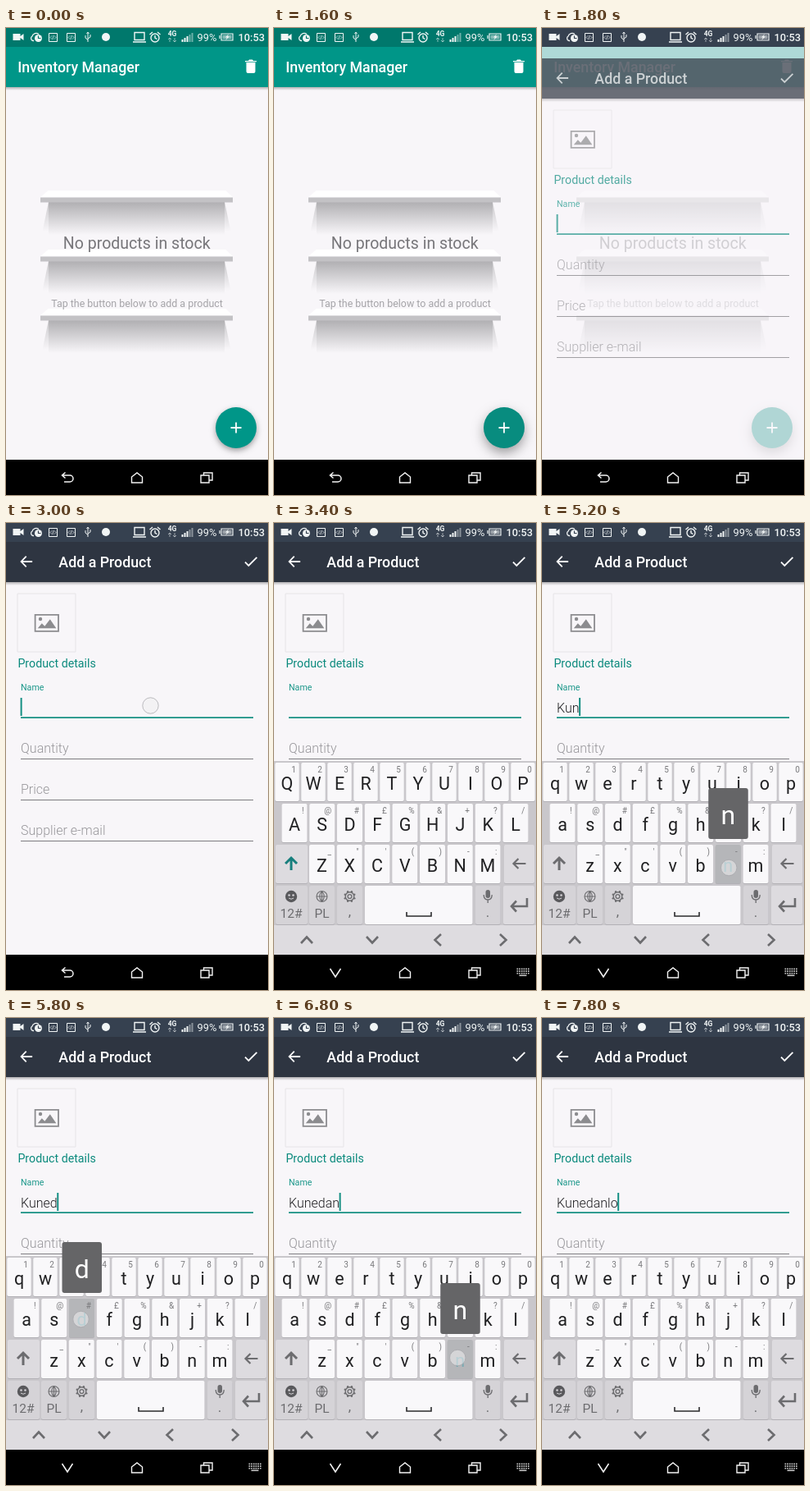
Write an HTML page with a canvas that moves like this. It is 320 by 569 pixels and loops after 8000 ms.

```html
<!DOCTYPE html>
<html lang="en">
<head>
<meta charset="utf-8">
<title>Inventory Manager</title>
<style>
html, body { margin: 0; width: 100%; height: 100%; overflow: hidden; background: #000; }
canvas { display: block; width: 320px; height: 569px; }
</style>
</head>
<body>
<canvas id="stage"></canvas>
<script>
const W = 320, H = 569, LOOP = 8000, STEP = 200;
const TEAL = '#009688', PAGE = '#f8f6f9';
const canvas = document.getElementById('stage');
const ctx = canvas.getContext('2d');
const ratio = window.devicePixelRatio || 1;
canvas.width = W * ratio;
canvas.height = H * ratio;

function rect(x, y, w, h, color, r = 0) {
  ctx.fillStyle = color;
  ctx.beginPath();
  ctx.roundRect(x, y, w, h, r);
  ctx.fill();
}

function disc(x, y, r, color) {
  ctx.fillStyle = color;
  ctx.beginPath();
  ctx.arc(x, y, r, 0, Math.PI * 2);
  ctx.fill();
}

function label(str, x, y, size, color, style = 400, align = 'left') {
  ctx.font = `${style} ${size}px Roboto, sans-serif`;
  ctx.textAlign = align;
  ctx.fillStyle = color;
  ctx.fillText(str, x, y);
}

// Key caps use the condensed cut where the font offers it.
function keyLabel(str, x, y, size, color) {
  label(str, x, y, size, color, '400 condensed', 'center');
}

// Path centred on (x, y); a width of 0 fills it.
function icon(d, x, y, color, width = 0) {
  const path = new Path2D(d);
  ctx.save();
  ctx.translate(x, y);
  if (width) {
    ctx.strokeStyle = color;
    ctx.lineWidth = width;
    ctx.stroke(path);
  } else {
    ctx.fillStyle = color;
    ctx.fill(path, 'evenodd');
  }
  ctx.restore();
}

function fade(y0, y1, from, to) {
  const g = ctx.createLinearGradient(0, y0, 0, y1);
  g.addColorStop(0, from);
  g.addColorStop(1, to);
  return g;
}

function statusBar(color) {
  const ink = '#f1f5f5';
  rect(0, 0, W, 23, color);
  icon('M-6 -4H3V4H-6ZM3 -1L7 -4V4L3 1Z', 14.5, 11, ink);
  icon('M-1 4H-2A3 3 0 0 1 -3 -1.5A5 5 0 0 1 5 -4', 35, 11.5, ink, 1.3);
  disc(39.5, 12.5, 4.5, ink);
  icon('M0 -3V0H3', 39.5, 12.5, color, 1.2);
  for (const x of [57.5, 79.5]) {
    icon('M-5 -5H5V5H-5Z', x, 11.5, ink, 1);
    icon('M-1.5 -2L-3.5 0L-1.5 2M1.5 -2L3.5 0L1.5 2M.7 -2.5L-.7 2.5', x, 11.5, ink, .7);
  }
  icon('M0 6V-5M-3 -2V1L0 3.5M3 -3V0L0 2M-1.5 -4L0 -6L1.5 -4', 100, 11, ink, 1);
  disc(122, 11, 5, ink);
  icon('M-6 -5.5H6V3.5H-6ZM-8 6H8', 163, 11, ink, 1.4);
  icon('M5 1A5 5 0 1 1 -5 1A5 5 0 1 1 5 1M0 -2V1L2.5 2.5M-6.5 -3L-3 -6M6.5 -3L3 -6', 182, 11, ink, 1.4);
  label('4G', 203, 9.5, 8.5, ink, 700, 'center');
  icon('M-3 5V0M-5 2L-3 0L-1 2M3 0V5M1 3L3 5L5 3', 203, 12, 'rgba(241,245,245,.55)', 1);
  for (let i = 0; i < 5; i++) {
    rect(214.5 + i * 3, 14 - i * 2, 2, 3 + i * 2, i < 3 ? ink : 'rgba(241,245,245,.45)');
  }
  label('99%', 245.5, 16, 12.8, ink, 400, 'center');
  icon('M-6 -4H8V4H-6ZM-8 -2V2', 269, 11, ink, 1.2);
  rect(264.5, 8.5, 11, 5, 'rgba(241,245,245,.55)');
  icon('M2 -4L-2 .5H0L-2 4L3 -.8H.5Z', 270, 11, ink);
  label('10:53', 316, 16, 12.8, ink, 500, 'right');
}

function appBar(color, title, x) {
  rect(0, 72, W, 4, fade(72, 76, 'rgba(0,0,0,.28)', 'rgba(0,0,0,0)'));
  rect(0, 23, W, 49, color);
  label(title, x, 54, 17.8, '#fff', 500);
}

function shelf(y) {
  icon('M-108 -8H109L117.5 0H-117.5Z', 159.5, y, '#fff');
  rect(52, y + 6, 215, 42, fade(y + 6, y + 46, '#b0afb2', PAGE));
  const side = fade(y + 6, y + 42, '#c9c8cb', PAGE);
  for (const s of [1, -1]) {
    ctx.fillStyle = side;
    ctx.beginPath();
    ctx.moveTo(159.5 - s * 107.5, y + 6);
    ctx.lineTo(159.5 - s * 115, y + 42);
    ctx.lineTo(159.5 - s * 107.5, y + 42);
    ctx.fill();
  }
  rect(42, y, 235, 6.5, '#c3c2c5');
  rect(42, y, 235, 1, '#dddcdf');
}

function stockPage(t) {
  rect(0, 0, W, 526, PAGE);
  for (let i = 0; i < 3; i++) shelf(206 + i * 72);
  label('No products in stock', 159.7, 269, 19.56, '#77767a', 400, 'center');
  label('Tap the button below to add a product', 160, 340, 12.44, '#a5a4a8', 400, 'center');
  appBar(TEAL, 'Inventory Manager', 14.2);
  icon('M-5.5 -5H5.5V6Q5.5 8 3.5 8H-3.5Q-5.5 8 -5.5 6ZM-7 -7H-3L-2 -8.5H2L3 -7H7V-5.7H-7Z', 299, 47, '#fff');

  const lift = Math.min(1, Math.max(0, (t - 800) / 600));
  ctx.save();
  ctx.shadowColor = 'rgba(0,0,0,.36)';
  ctx.shadowBlur = (7 + 7 * lift) * ratio;
  ctx.shadowOffsetY = (3 + 3 * lift) * ratio;
  disc(281, 487, 25, TEAL);
  ctx.restore();
  if (lift) disc(281, 487, 8 + 17 * lift, 'rgba(40,100,90,.2)');
  icon('M-6.5 0H6.5M0 -6.5V6.5', 281, 487, '#fff', 1.8);
  if (t >= 1000 && t < 1400) touch(281, 488);
}

function touch(x, y) {
  disc(x, y, 10, 'rgba(238,239,241,.55)');
  icon('M9.7 0A9.7 9.7 0 1 1 -9.7 0A9.7 9.7 0 1 1 9.7 0', x, y, 'rgba(150,150,155,.6)', 1);
}

function formPage(text, caret) {
  rect(0, 0, W, 526, PAGE);
  appBar('#2e3541', 'Add a Product', 64.3);
  icon('M7.1 0H-6M-.3 -6.4L-6.4 0L-.3 6.4', 25, 47, '#fff', 1.8);
  icon('M-7 .6L-2.7 5L7.4 -5.1', 299, 47, '#fff', 1.8);

  icon('M-35.5 -35.5H35.5V35.5H-35.5Z', 49.5, 121.5, '#e6e4e7', 1);
  icon('M-14.2 -10H14.2V10H-14.2Z', 49.8, 121.8, '#8c8c8f', 1.8);
  icon('M-11 6.5L-6 .5L-2.5 4L4 -4.5L11.5 6.5Z', 49.8, 121.8, '#8c8c8f');
  disc(42, 117, 2.2, '#8c8c8f');

  label('Product details', 14.4, 176, 14.22, '#0b8a7d');
  label('Name', 18, 204, 10.67, '#1b978a');
  rect(18, 236.3, 284, 1.8, '#169083');
  label(text, 18, 230.5, 16, '#1f1f22', 300);
  if (caret) {
    ctx.font = '300 16px Roboto, sans-serif';
    rect(17.6 + ctx.measureText(text).width, 213, 2, 22, '#148f83');
  }
  ['Quantity', 'Price', 'Supplier e-mail'].forEach((hint, i) => {
    label(hint, 18, 279.5 + i * 50, 16, '#98979b', 300);
    rect(18, 287 + i * 50, 284, 1, '#7d7c80');
  });
}

const ROWS = [
  { keys: 'qwertyuiop', alt: '1234567890', x: 16, pitch: 32, w: 29.5 },
  { keys: 'asdfghjkl', alt: '!@#£%&+?/', x: 25, pitch: 33.75, w: 31 },
  { keys: 'zxcvbnm', alt: '_"\'()-:', x: 58.5, pitch: 33.75, w: 31 }
];

function keyAt(ch) {
  const r = ROWS.findIndex(row => row.keys.includes(ch));
  const row = ROWS[r];
  return { x: row.x + row.keys.indexOf(ch) * row.pitch, y: 292 + r * 50, w: row.w };
}

function keyCap(x, y, w, color) {
  rect(x, y + 1, w, 47, '#b2b0b5', 2);
  rect(x, y, w, 47, color, 2);
}

function keyboard(upper, press) {
  const grey = '#dddbdf', dim = '#d5d3d7', white = '#f9f8fa', ink = '#6c6c6f';
  const shown = ch => upper ? ch.toUpperCase() : ch;
  rect(0, 290, W, 236, '#c9c7cb');
  rect(0, 490, W, 36, '#dedce0');
  for (const row of ROWS) {
    [...row.keys].forEach((ch, i) => {
      const k = keyAt(ch), down = press && press.ch === ch;
      keyCap(k.x - k.w / 2, k.y, k.w, down ? '#b5b6b9' : white);
      label(row.alt[i], k.x + k.w / 2 - 4, k.y + 12, 10, '#78787b', '400 condensed', 'right');
      keyLabel(shown(ch), k.x, k.y + 33, 21.5, down ? '#79a9b2' : '#202022');
    });
  }

  keyCap(2, 392, 39, grey);
  icon('M0 8V-7M-7 0L0 -7L7 0', 21, 415, upper ? '#177f7d' : ink, 3);
  keyCap(281, 392, 37, grey);
  icon('M8 0H-7M-1 -6L-7 0L-1 6', 299.5, 415, ink, 2.2);

  keyCap(2, 442, 39, dim);
  disc(21, 455, 7.2, '#59595c');
  disc(18.5, 453.5, 1.3, dim);
  disc(23.5, 453.5, 1.3, dim);
  icon('M-3 2Q0 4.5 3 2', 21, 455, dim, 1);
  keyLabel('12#', 21, 481, 15.5, ink);

  keyCap(43, 442, 31, dim);
  icon('M6.5 0A6.5 6.5 0 1 1 -6.5 0A6.5 6.5 0 1 1 6.5 0M-6.5 0H6.5M0 -6.5V6.5M0 -6.5Q-5.5 0 0 6.5M0 -6.5Q5.5 0 0 6.5', 58.5, 455, ink, 1.1);
  keyLabel('PL', 58.5, 481, 15.5, ink);

  keyCap(77, 442, 31, dim);
  icon('M5.3 0A5.3 5.3 0 1 1 -5.3 0A5.3 5.3 0 1 1 5.3 0M2.4 0A2.4 2.4 0 1 1 -2.4 0A2.4 2.4 0 1 1 2.4 0', 92.5, 455, ink, 1.4);
  for (let i = 0; i < 8; i++) {
    const a = (i + .5) * Math.PI / 4;
    disc(92.5 + 6.2 * Math.cos(a), 455 + 6.2 * Math.sin(a), 1.2, ink);
  }
  keyLabel(',', 92.5, 479, 17, ink);

  keyCap(111, 442, 131.5, white);
  icon('M-15 -4V1H15V-4', 177, 478, '#2b2b2d', 1.6);

  keyCap(246, 442, 30.5, dim);
  rect(258.5, 447, 5.5, 10, ink, 2.7);
  icon('M-5 -2Q-5 4 0 4Q5 4 5 -2M0 4V8', 261.2, 455, ink, 1.3);
  keyLabel('.', 261, 480, 17, ink);

  keyCap(280, 442, 38, grey);
  icon('M10 -8V2H-9M-3 -4.5L-9 2L-3 8.5', 299, 465, ink, 2.6);

  icon('M-7 4L0 -3.5L7 4', 40, 508, ink, 2.6);
  icon('M-7 -4L0 3.5L7 -4', 120, 508, ink, 2.6);
  icon('M4 -7L-3.5 0L4 7', 200, 508, ink, 2.6);
  icon('M-4 -7L3.5 0L-4 7', 280, 508, ink, 2.6);

  if (press) {
    const k = keyAt(press.ch), i = press.index;
    const x = Math.min(270, Math.max(4, k.x - 24));
    touch(k.x + 3 - i, k.y + 31 - 1.5 * i);
    rect(x, k.y - 69, 48.5, 62, '#656567', 3);
    keyLabel(shown(press.ch), x + 24.2, k.y - 25, 32, '#fff');
  }
}

function navBar(typing) {
  const ink = '#f4f4f4';
  rect(0, 526, W, 43, '#000');
  if (typing) {
    icon('M-6.5 -5L0 5L6.5 -5', 75, 548, ink, 1.5);
    for (let i = 0; i < 18; i++) {
      rect(296.5 + i % 6 * 2.7, 542.5 + Math.floor(i / 6) * 2.7, 1.7, 1.7, '#c4c4c4');
    }
    rect(299.5, 550.5, 9, 1.6, '#c4c4c4');
  } else {
    icon('M-6 -3H3A4 4 0 0 1 3 5H-4M-2.5 -6.5L-6.5 -3L-2.5 .5', 75, 548, ink, 1.5);
  }
  icon('M-6.5 6V-1L0 -6L6.5 -1V6Z', 160, 548, ink, 1.4);
  icon('M-7 -3H3V6H-7ZM-3.5 -3V-6H7V3H3', 245, 548, ink, 1.4);
}

const WORD = 'Kunedanlo';
const DOWN = [4200, 4600, 5200, 5600, 5800, 6400, 6800, 7000, 7600];

function caretOn(t) {
  return !(t >= 2200 && t < 2800 || t >= 3400 && t < 3800);
}

function draw(t) {
  ctx.setTransform(ratio, 0, 0, ratio, 0, 0);
  const count = DOWN.filter(d => d <= t).length;
  const index = count - 1;
  const held = count > 0 && t < DOWN[index] + STEP;
  const press = held ? { ch: WORD[index].toLowerCase(), index } : null;

  if (t < 2000) stockPage(t);
  if (t >= 1800) {
    ctx.save();
    if (t < 2000) {
      ctx.globalAlpha = .7;
      ctx.translate(0, 14);
    }
    formPage(WORD.slice(0, count), caretOn(t));
    ctx.restore();
    if (t >= 2800 && t < 3200) touch(176.5, 222.5);
  }
  statusBar(t < 1800 ? '#00786c' : '#364150');
  if (t >= 3200) {
    ctx.save();
    if (t < 3400) ctx.translate(0, 70);
    keyboard(t < 4400, press);
    ctx.restore();
  }
  navBar(t >= 3200);
}

const start = performance.now();
function tick() {
  const t = (performance.now() - start) % LOOP;
  draw(Math.floor(t / STEP) * STEP);
  requestAnimationFrame(tick);
}
tick();
</script>
</body>
</html>
```
